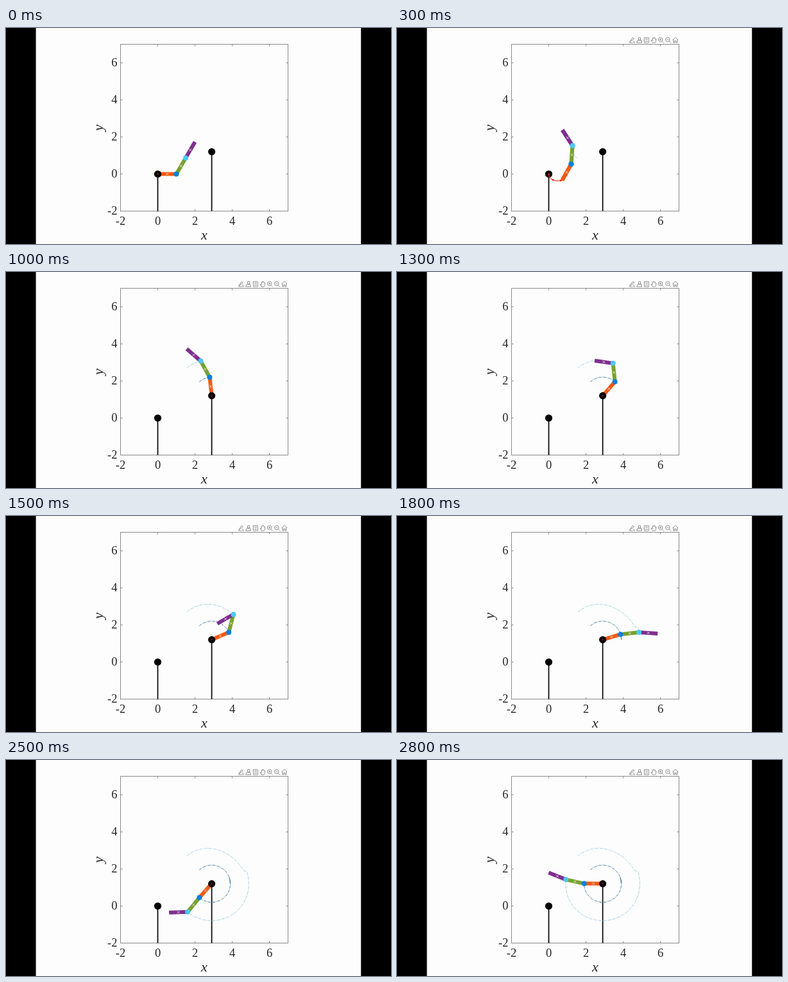
Write an HTML page with a canvas that moves like this. It is 600 by 338 pixels and loops after 2900 ms.

```html
<!DOCTYPE html>
<html lang="en">
<head>
<meta charset="utf-8">
<title>Swinging three-link chain</title>
<style>
  html, body { margin: 0; width: 100%; height: 100%; overflow: hidden; background: #000; }
  canvas { display: block; width: 600px; height: 338px; }
</style>
</head>
<body>
<canvas id="stage" width="600" height="338"></canvas>
<script>
const ctx = document.getElementById('stage').getContext('2d');
const { PI, sin, cos, exp } = Math;
const STEP = 100, STEPS = 29, CATCH = 8, SNAP = 17.5, LINK = 29;
const BOX = { left: 178.5, top: 25.5, right: 439.5, bottom: 286.5 };
const BASE = [236.5, 228.5], POLE = [320.6, 193.6];

const poly = (t, ...coefs) => coefs.reduceRight((sum, c) => sum * t + c, 0);

function extend([x, y], degrees, length = LINK) {
  const r = degrees * PI / 180;
  return [x + length * cos(r), y - length * sin(r)];
}

// Free flight: the first joint follows a parabola while the links turn.
function flight(t) {
  const joint = [poly(t, 265.5, 0.34, 0.554), poly(t, 228.5, -2.99, -0.726)];
  return {
    root: extend(joint, poly(t, 0, 21.3, -0.33), -LINK),
    angles: [poly(t, 0, 21.3, -0.33), poly(t, 60, 11.16, -1.32, 0.163), poly(t, 60, 30.6, -3.21)]
  };
}

// Swing about the pole: the first two links bend symmetrically about their
// common direction, and the last one whips round after they snap straight.
function swing(s) {
  const u = s - CATCH, w = s - SNAP;
  let heading, bend, tip;
  if (w < 0) {
    heading = poly(u, 131.5, -12.1, 0.056);
    bend = 26 * sin(u * PI / 14);
    tip = 120 + 9.5 * u + 141 * (u / 10) ** 5;
  } else {
    heading = poly(w, 22.2, -21.5, 0.155);
    bend = 28 * exp(-8 * w) - 6 * cos((w - 0.3) * PI / 5);
    tip = 357 - 200 / (1 + exp((5.7 - w) / 0.923));
  }
  return { root: POLE, angles: [heading - bend, heading + bend, tip] };
}

function pose(s) {
  const { root, angles } = s < CATCH ? flight(s) : swing(s);
  const joints = [root];
  angles.forEach((angle, i) => joints.push(extend(joints[i], angle)));
  return joints;
}

function line(points, color, width, dash = [], cap = 'butt') {
  ctx.beginPath();
  points.forEach(p => ctx.lineTo(p[0], p[1]));
  ctx.strokeStyle = color;
  ctx.lineWidth = width;
  ctx.lineCap = cap;
  ctx.setLineDash(dash);
  ctx.stroke();
  ctx.setLineDash([]);
}

function dot([x, y], radius, color) {
  ctx.beginPath();
  ctx.arc(x, y, radius, 0, PI * 2);
  ctx.fillStyle = color;
  ctx.fill();
}

function label(text, x, y, align, font = '18.5px') {
  ctx.font = font + ' "Liberation Serif", serif';
  ctx.textAlign = align;
  ctx.fillStyle = '#262626';
  ctx.fillText(text, x, y);
}

function drawAxes() {
  const { left, top, right, bottom } = BOX, grey = '#8a8a8a';
  ctx.fillStyle = '#000';
  ctx.fillRect(0, 0, 600, 338);
  ctx.fillStyle = '#fdfdfd';
  ctx.fillRect(46.6, 0, 506.6, 338);
  ctx.strokeStyle = grey;
  ctx.lineWidth = 1;
  ctx.strokeRect(left, top, right - left, bottom - top);
  for (let v = -2; v <= 6; v += 2) {
    const x = BASE[0] + v * LINK, y = BASE[1] - v * LINK;
    line([[x, bottom], [x, bottom - 3]], grey, 1);
    line([[x, top], [x, top + 3]], grey, 1);
    line([[left, y], [left + 3, y]], grey, 1);
    line([[right, y], [right - 3, y]], grey, 1);
    label(String(v), x, 307.5, 'center');
    label(String(v), 173.5, y + 5.5, 'right');
  }
  label('x', 309, 331, 'center', 'italic 22px');
  ctx.save();
  ctx.translate(151, 156);
  ctx.rotate(-PI / 2);
  label('y', 0, 0, 'center', 'italic 22px');
  ctx.restore();
}

function drawToolbar() {
  const lens = 'M2.6 -.8A3.3 3.3 0 1 1 -4 -.8A3.3 3.3 0 1 1 2.6 -.8M1.7 1.7L4.5 4.5M-2.3 -.8H.9';
  const icons = [
    'M-4 3L1 -4L3 -2L-4 3M-4 4H1M2 1L4 4H2',
    'M-1 -4H2V0H-1ZM-2 0H3L4 4H-4Z',
    'M-3.5 -4H3.5V4H-3.5ZM-2 -1.5H2M-2 1.5H2',
    'M-2 4L-4 0L-2 1V-3H-.7V-4H.7V-3.5H2V-2H3.5V2L2 4Z',
    lens + 'M-.7 -2.4V.8',
    lens,
    'M-4.5 0L0 -4.5L4.5 0M-3 -1V4H-1V1H1V4H3V-1'
  ];
  ctx.strokeStyle = '#7c7c7c';
  ctx.lineWidth = 0.85;
  icons.forEach((shape, i) => {
    ctx.save();
    ctx.translate(366.3 + i * 11.25, 19);
    ctx.stroke(new Path2D(shape));
    ctx.restore();
  });
}

function drawTrails(s) {
  const start = s < CATCH ? 0 : CATCH, path = [];
  for (let k = 0; k <= (s - start) * 10; k++) path.push(pose(start + k / 10));
  const trail = joint => path.map(p => p[joint]);
  const dashDot = [4, 1.2, 1, 1.2];
  line(trail(2), '#8fc8de', 0.9, dashDot);
  line(trail(1), '#1d5f8a', 0.9, dashDot);
  if (s > 0 && s < CATCH) {
    line(trail(0), '#f0341c', 1.2);
    line(trail(0), '#e8260f', 2.7, [0.1, 11.9], 'round');
  }
}

function drawChain(joints) {
  ['#f25a14', '#77a22e', '#7e2f8e'].forEach((color, i) => {
    const p = joints[i], q = joints[i + 1];
    line([p, q], color, 6);
    const x = (p[0] + q[0]) / 2, y = (p[1] + q[1]) / 2;
    for (const d of [-2, 2]) line([[x - 2, y - d], [x + 2, y + d]], '#f4e8e4', 0.8);
  });
  dot(joints[1], 4, '#0a80dc');
  dot(joints[2], 4, '#4dc6f4');
}

function draw(s) {
  const joints = pose(s), attached = s === 0 || s >= CATCH;
  drawAxes();
  if (s > 0) drawToolbar();
  for (const p of [BASE, POLE]) line([p, [p[0], BOX.bottom]], '#000', 1.7);
  if (attached) drawTrails(s);
  drawChain(joints);
  dot(BASE, 5.6, '#000');
  dot(POLE, 5.6, '#000');
  if (attached) dot(joints[0], 1.2, '#a8200c');
  else drawTrails(s);
  if (!attached) drawChain(joints);
}

const origin = performance.now();
function tick() {
  const elapsed = Math.max(0, performance.now() - origin);
  draw(Math.floor(elapsed / STEP) % STEPS);
  requestAnimationFrame(tick);
}
tick();
</script>
</body>
</html>
```
